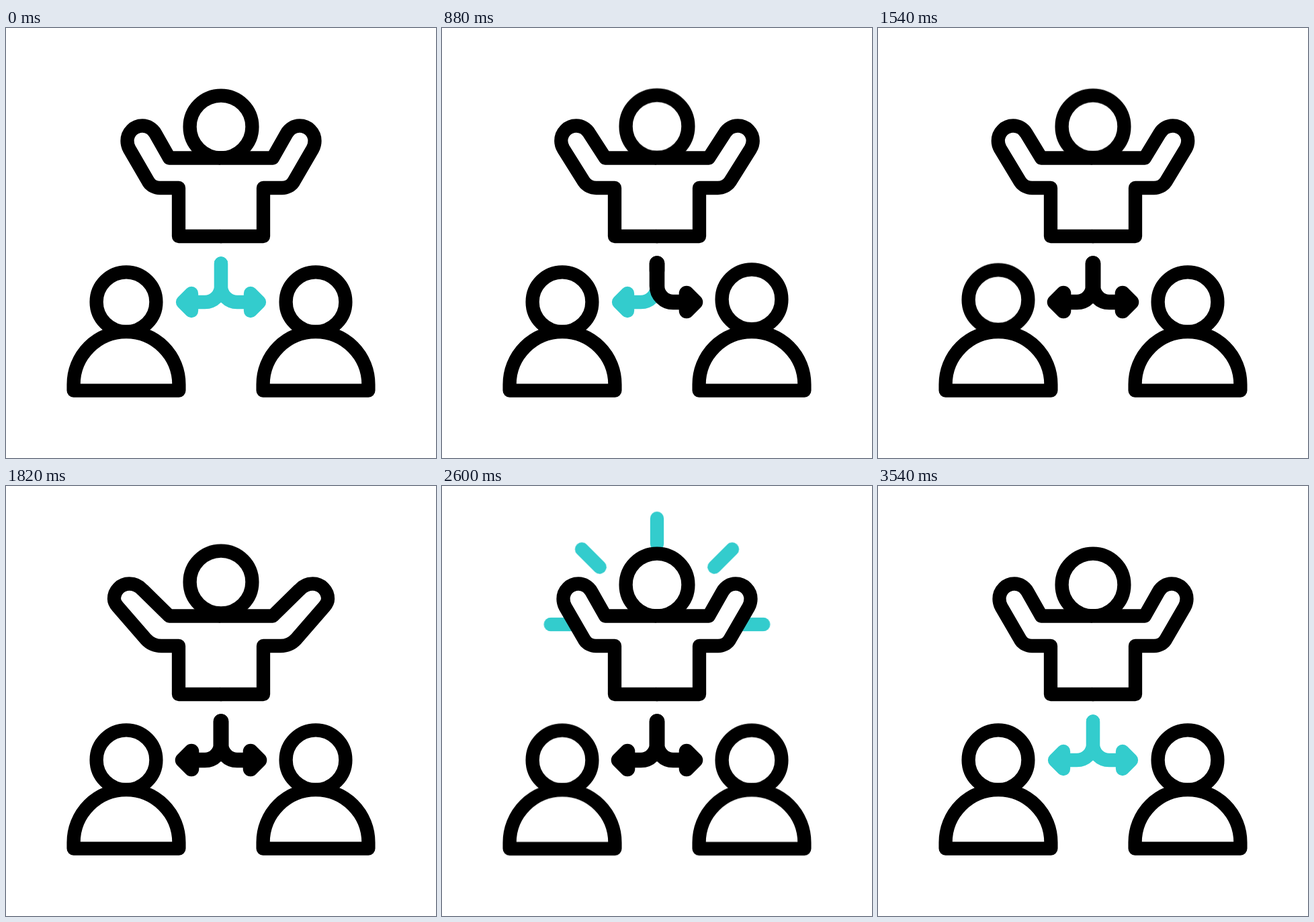
An HTML page without scripts that plays this animation: 640 by 640 pixels, repeating every 3600 ms.

```html
<!DOCTYPE html>
<html lang="en">
<head>
<meta charset="utf-8">
<title>Team leader</title>
<style>
  html, body { margin: 0; width: 100%; height: 100%; overflow: hidden; background: #fff; }
  svg { display: block; width: 100vw; height: 100vh; }
  .ink, .teal { stroke-width: 20.3; stroke-linecap: round; stroke-linejoin: round; }
  .ink { stroke: #000; fill: #fff; }
  .teal { stroke: #33cccd; fill: none; }
  .teal .tip { fill: #33cccd; }
  .drawn { stroke-width: 22.6; fill: none; }
  .drawn .tip { fill: #000; transform-origin: 388.3px 408px; }
  .drawn .shaft { stroke-dasharray: 1 2; }
  .half, .nod, .bob, .bounce, .ray, .shaft, .tip {
    animation: 3.6s cubic-bezier(.37, 0, .63, 1) infinite;
  }

  .half { animation-name: wave; }
  .nod { animation-name: nod; }
  .bob { animation-name: bob; }
  .left .bob { animation-delay: -2.8s; }
  .bounce { animation-name: bounce; }
  .ray { animation-name: shine; }
  .drawn .right .shaft { animation-name: shaft-right; }
  .drawn .left .shaft { animation-name: shaft-left; }
  .drawn .right .tip { animation-name: tip-right; }
  .drawn .left .tip { animation-name: tip-left; }

  @keyframes wave {
    0%, 22.222%, 44.444%, 66.667%, 100% {
      d: path("M321 310 H257 V238 H229 C222 238 215.5 234.5 212 229 L183.5 179.8 C181.5 176 180.5 172 180.5 168 C180.5 155.5 190.5 145.5 203 145.5 C211 145.5 218.5 150 222.5 157.3 L243 193.5 H321");
    }
    11.111%, 33.333%, 55.556% {
      d: path("M321 310 H257 V238 H233 C223 238 213 234 205.5 227 L154 179.5 C150 176 147 172 147 168 C147 155.5 157 145.5 169.5 145.5 C177 145.5 184 148.5 190 153 L243 193.5 H321");
    }
  }
  @keyframes nod {
    0%, 22.222%, 44.444%, 66.667%, 100% { transform: none; }
    11.111%, 33.333%, 55.556% { transform: translateY(-7px); }
  }
  @keyframes bob {
    0%, 17.222%, 28.333%, 39.444%, 100% { transform: none; }
    22.778%, 33.889% { transform: translateY(-5px); }
  }
  @keyframes bounce {
    0%, 61.667%, 72.778%, 83.889%, 95%, 100% { transform: none; }
    67.222%, 78.333%, 89.444% { transform: translateY(11px); }
  }
  @keyframes shine {
    0%, 63.889%, 81.111%, 98.333%, 100% { transform: translateY(136px); }
    72.5%, 89.722% { transform: none; }
  }
  @keyframes shaft-right {
    0%, 84.444%, 100% { stroke-dashoffset: 1.02; }
    9.444%, 76.667% { stroke-dashoffset: 0; }
  }
  @keyframes shaft-left {
    0%, 22.222%, 84.444%, 100% { stroke-dashoffset: 1.02; }
    31.667%, 76.667% { stroke-dashoffset: 0; }
  }
  @keyframes tip-right {
    0%, 8.333%, 78.889%, 100% { transform: scale(0); }
    15.556%, 72.778% { transform: none; }
  }
  @keyframes tip-left {
    0%, 30.556%, 78.889%, 100% { transform: scale(0); }
    37.778%, 72.778% { transform: none; }
  }
</style>
</head>
<body>
<svg viewBox="0 0 640 640">
  <g class="teal" transform="translate(320 206)">
    <g transform="rotate(-90)"><path class="ray" d="M0 -158.5V-120"/></g>
    <g transform="rotate(-45)"><path class="ray" d="M0 -158.5V-121"/></g>
    <g><path class="ray" d="M0 -158V-120"/></g>
    <g transform="rotate(45)"><path class="ray" d="M0 -158.5V-121"/></g>
    <g transform="rotate(90)"><path class="ray" d="M0 -158.5V-120"/></g>
  </g>

  <!-- leader -->
  <g class="ink">
    <circle class="nod" cx="320" cy="147" r="46.4"/>
    <path class="half"/>
    <g transform="matrix(-1 0 0 1 640 0)"><path class="half"/></g>
  </g>

  <!-- arrows -->
  <g class="teal">
    <path d="M320 350.5V384a24 24 0 0 0 24 24H364"/>
    <path class="tip" d="M364 395l13 13-13 13z"/>
    <g transform="matrix(-1 0 0 1 640 0)">
      <path d="M320 350.5V384a24 24 0 0 0 24 24H364"/>
      <path class="tip" d="M364 395l13 13-13 13z"/>
    </g>
  </g>
  <g class="ink drawn">
    <g class="right">
      <path class="shaft" pathLength="1" d="M320 350.5V384a24 24 0 0 0 24 24H364"/>
      <path class="tip" d="M364 395l13 13-13 13z"/>
    </g>
    <g class="left" transform="matrix(-1 0 0 1 640 0)">
      <path class="shaft" pathLength="1" d="M320 350.5V384a24 24 0 0 0 24 24H364"/>
      <path class="tip" d="M364 395l13 13-13 13z"/>
    </g>
  </g>

  <!-- team -->
  <g class="ink left" transform="translate(179)">
    <g class="bounce">
      <circle class="bob" cy="407.7" r="44.4"/>
      <path d="M-78.4 539.6V530.4a78.4 78.4 0 0 1 156.8 0V539.6z"/>
    </g>
  </g>
  <g class="ink right" transform="translate(461)">
    <g class="bounce">
      <circle class="bob" cy="407.7" r="44.4"/>
      <path d="M-78.4 539.6V530.4a78.4 78.4 0 0 1 156.8 0V539.6z"/>
    </g>
  </g>
</svg>
</body>
</html>
```
